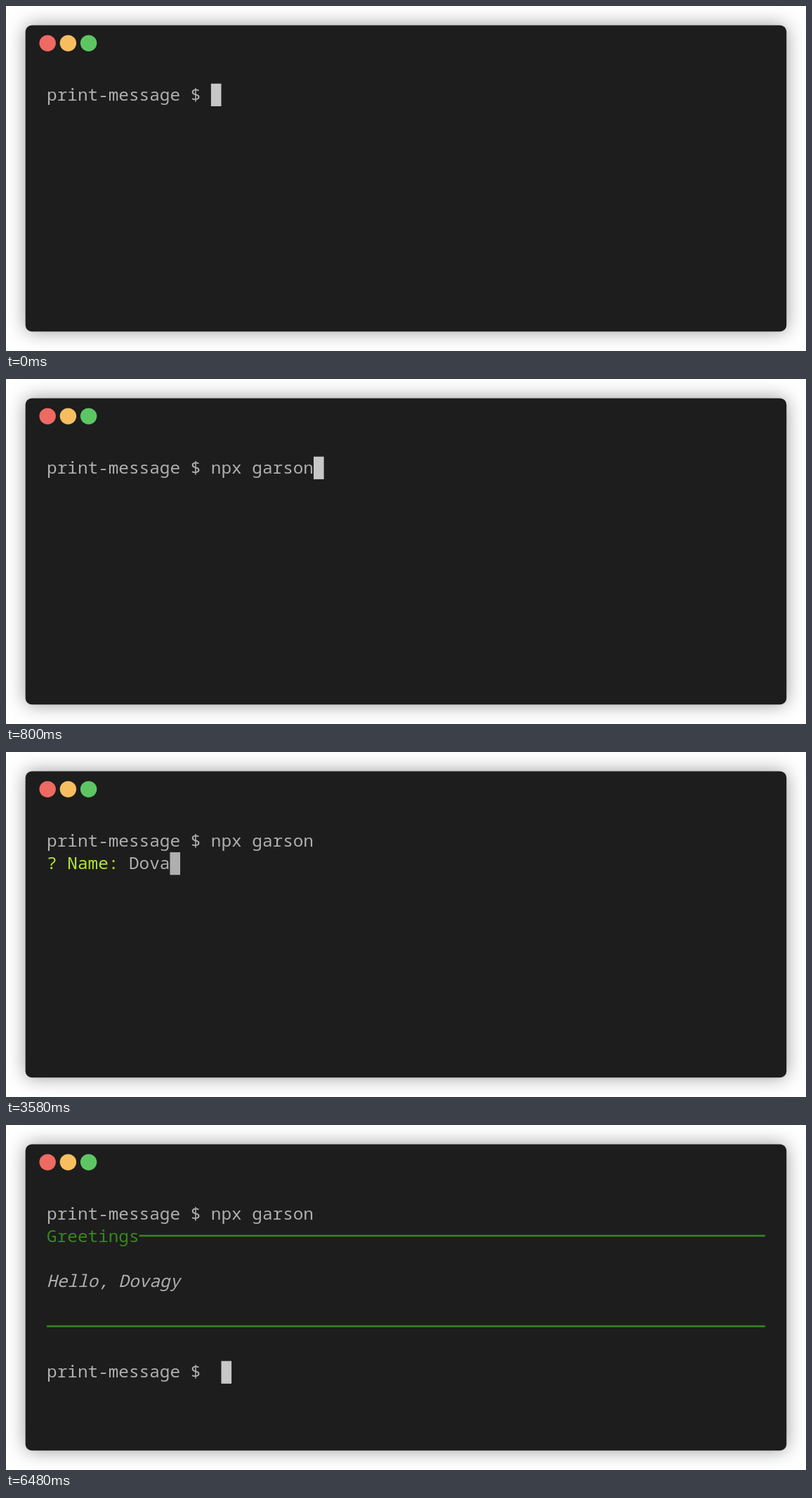
Write an HTML page with a canvas that moves like this. It is 1139 px wide and 492 px high and loops after 6580 ms.

```html
<!DOCTYPE html>
<html lang="en">
<head>
<meta charset="utf-8">
<title>Terminal</title>
<style>
  html, body { margin: 0; width: 100%; height: 100%; overflow: hidden; background: #fff; }
  canvas { display: block; }
</style>
</head>
<body>
<canvas id="stage" width="1139" height="492"></canvas>
<script>
const ctx = document.getElementById('stage').getContext('2d');

const LOOP = 6580;
const LEFT = 58.1, TOP = 110.7, CELL = 14.61, ROW = 32.27, COLUMNS = 70;
const FONT = '24.35px "Noto Sans Mono", monospace';
const COLOR = {
  window: '#1d1d1d', text: '#afafaf', cursor: '#c7c7c7',
  prompt: '#b3e33b', box: '#38861f'
};

const SHELL = 'print-message $ ';
const COMMAND = 'npx garson';
const QUESTION = '? Name: ';
const NAME = 'Dovagy';

// Times in ms
const KEY_STEP = 80;
const NAME_KEYS = [2750, 3100, 3290, 3580, 3690, 3960];
const ENTER = 900, CLEARED = 970, ASK = 1040;
const OUTPUT = 4380, SHELL_BACK = 4480, EXTRA_SPACE = 6480;

const cellX = column => LEFT + column * CELL;
const rowY = row => TOP + row * ROW;

function write(text, row, column = 0, color = COLOR.text, style = '') {
  ctx.font = style + FONT;
  ctx.fillStyle = color;
  [...text].forEach((char, i) => ctx.fillText(char, cellX(column + i), rowY(row) + 23.8));
}

function cursor(row, column, color = COLOR.cursor) {
  ctx.fillStyle = color;
  ctx.fillRect(cellX(column), rowY(row), CELL, ROW);
}

function rule(row, column = 0) {
  ctx.fillStyle = COLOR.box;
  ctx.fillRect(cellX(column), rowY(row) + 13.7, (COLUMNS - column) * CELL, 2.6);
}

function drawWindow() {
  ctx.fillStyle = '#fff';
  ctx.fillRect(0, 0, 1139, 492);

  ctx.save();
  ctx.shadowColor = 'rgba(0, 0, 0, 0.4)';
  ctx.shadowBlur = 27;
  ctx.fillStyle = COLOR.window;
  ctx.beginPath();
  ctx.roundRect(27.7, 27.5, 1083.5, 436.7, 9);
  ctx.fill();
  ctx.restore();

  ['#ee6a62', '#f6be5f', '#5dc663'].forEach((color, i) => {
    ctx.fillStyle = color;
    ctx.beginPath();
    ctx.arc(59.2 + i * 29.2, 53.1, 11.7, 0, Math.PI * 2);
    ctx.fill();
  });
}

function drawQuestion(t) {
  const typed = NAME_KEYS.filter(time => time <= t).length;
  write(QUESTION, 1, 0, COLOR.prompt);
  write(NAME.slice(0, typed), 1, QUESTION.length);
  cursor(1, QUESTION.length + typed, COLOR.text);
}

function drawOutput(t) {
  const title = 'Greetings';
  write(title, 1, 0, COLOR.box);
  rule(1, title.length);
  write('Hello, ' + NAME, 3, 0, COLOR.text, 'italic ');
  rule(5);

  if (t < SHELL_BACK) {
    cursor(7, 0);
  } else {
    write(SHELL, 7);
    cursor(7, SHELL.length + (t >= EXTRA_SPACE ? 1 : 0));
  }
}

function draw(t) {
  const typed = Math.min(COMMAND.length, Math.floor(t / KEY_STEP));
  drawWindow();
  write(SHELL + COMMAND.slice(0, typed), 0);

  if (t < ENTER) cursor(0, SHELL.length + typed);
  else if (t < CLEARED) cursor(1, 0);
  else if (t >= OUTPUT) drawOutput(t);
  else if (t >= ASK) drawQuestion(t);
}

function tick(now) {
  draw(now % LOOP);
  requestAnimationFrame(tick);
}

draw(0);
requestAnimationFrame(tick);
</script>
</body>
</html>
```
